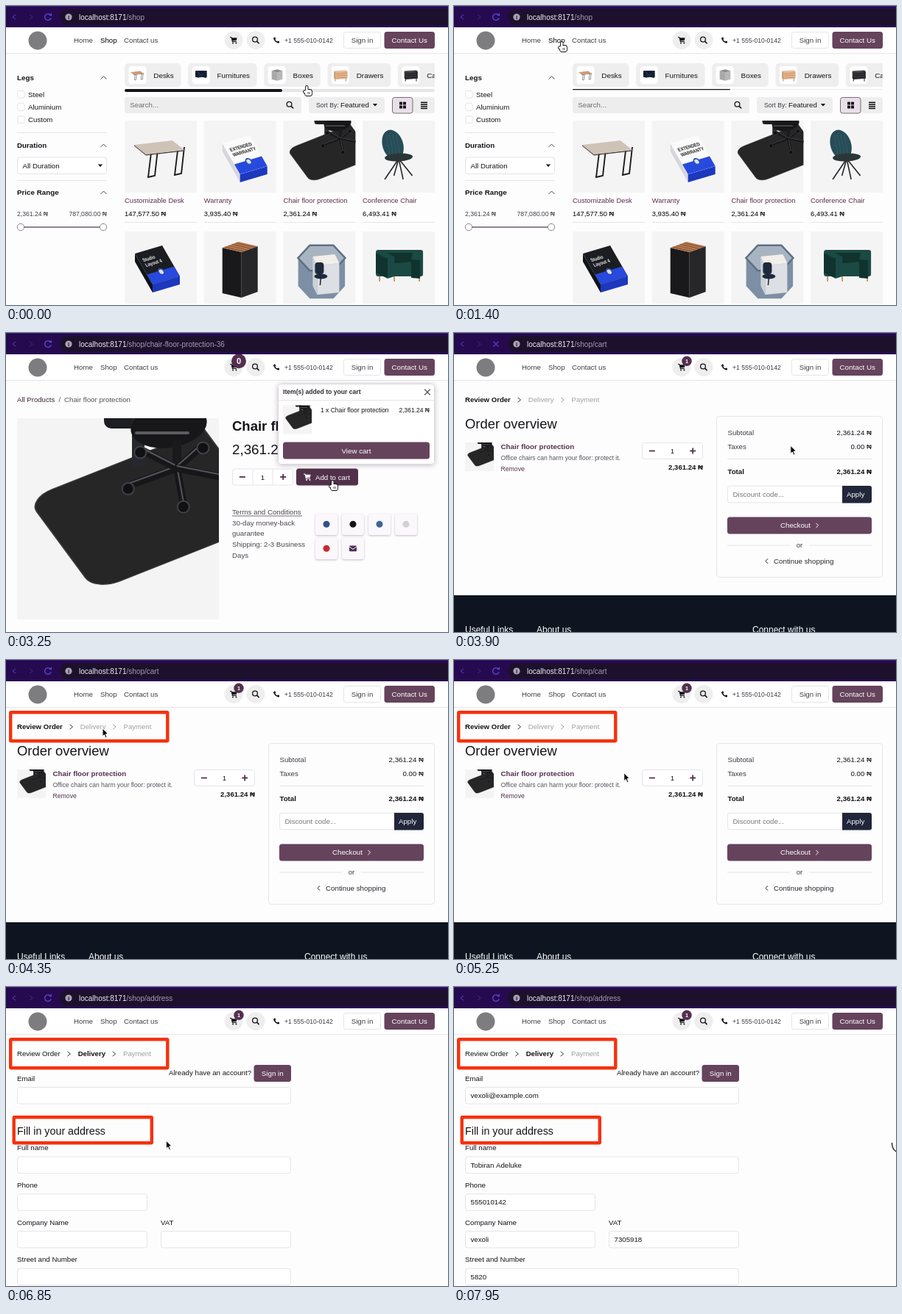
An HTML page with a canvas for the animation above (8 s loop, 600 by 407 pixels).

```html
<!DOCTYPE html>
<html lang="en">
<head>
<meta charset="utf-8">
<title>Shop checkout</title>
<style>
  html, body { margin: 0; width: 100%; height: 100%; overflow: hidden; background: #fff; }
  canvas { display: block; width: 600px; height: 407px; }
</style>
</head>
<body>
<canvas id="stage"></canvas>
<script>
const LOOP = 8000, W = 600, H = 407, TAU = Math.PI * 2;
const FONT = '"Liberation Sans", Arial, "DejaVu Sans", sans-serif';
const PLUM = '#65435c', PLUM_DARK = '#513149', INK = '#161318', GREY = '#55525a', SLATE = '#3f3c43';
const PALE = '#efeeef', LINE = '#e6e4e6', PHOTO = '#f5f4f5', RED = '#f6310d', TEAL = '#1b4a44';
const ITEM = 'Chair floor protection', PRICE = '2,361.24 ₦';
const RIGHT = { align: 'right' }, CENTER = { align: 'center' }, BOLD = { bold: true };

const canvas = document.getElementById('stage');
const dpr = window.devicePixelRatio || 1;
canvas.width = W * dpr;
canvas.height = H * dpr;
const g = canvas.getContext('2d');

// ---- helpers ----
const range = (n, fn) => Array.from({ length: n }, (_, i) => fn(i));
function ease(v) {
  v = Math.max(0, Math.min(1, v));
  return v * v * (3 - 2 * v);
}
function text(s, x, y, size = 9.7, color = INK, { bold, align = 'left' } = {}) {
  g.font = `${bold ? 'bold ' : ''}${size}px ${FONT}`;
  g.textAlign = align;
  g.fillStyle = color;
  g.fillText(s, x, y);
}
function paint(fill, stroke, lw = 1) {
  if (fill) { g.fillStyle = fill; g.fill(); }
  if (stroke) { g.strokeStyle = stroke; g.lineWidth = lw; g.stroke(); }
}
function box(x, y, w, h, r, fill, stroke, lw) {
  g.beginPath();
  g.roundRect(x, y, w, h, r);
  paint(fill, stroke, lw);
}
function oval(x, y, rx, ry, turn, fill) {
  g.beginPath();
  g.ellipse(x, y, rx, ry, turn, 0, TAU);
  paint(fill);
}
function disc(x, y, r, fill, stroke, lw) {
  g.beginPath();
  g.arc(x, y, r, 0, TAU);
  paint(fill, stroke, lw);
}
function trace(p) {
  g.beginPath();
  for (let i = 0; i < p.length; i += 2) g.lineTo(p[i], p[i + 1]);
}
function poly(fill, ...p) {
  trace(p);
  g.closePath();
  paint(fill);
}
function line(color, lw, ...p) {
  trace(p);
  paint(null, color, lw);
}
const rule = (x1, x2, y) => line(LINE, 1, x1, y, x2, y);
function scoped(draw) {
  g.save();
  draw();
  g.restore();
}
function shadowed(blur, draw) {
  scoped(() => {
    g.shadowColor = 'rgba(40,20,50,.28)';
    g.shadowBlur = blur * dpr;
    g.shadowOffsetY = dpr;
    draw();
  });
}

// ---- icons and controls ----
const chevronUp = (x, y) => line('#4a464e', 1, x - 4, y + 2, x, y - 2, x + 4, y + 2);
const chevron = (x, y, dx, color) => line(color, 1, x - dx, y - 3.2, x + dx, y, x - dx, y + 3.2);
const caret = (x, y) => poly(INK, x - 3.2, y - 1.6, x + 3.2, y - 1.6, x, y + 2);
const minus = (x, y) => box(x - 4, y - .9, 8, 1.8, 0, '#54304e');
function plus(x, y) {
  minus(x, y);
  box(x - .9, y - 4, 1.8, 8, 0, '#54304e');
}
function cross(x, y, r, color) {
  line(color, 1.2, x - r, y - r, x + r, y + r);
  line(color, 1.2, x - r, y + r, x + r, y - r);
}
function magnifier(x, y) {
  disc(x - 1, y - 1, 3.4, null, INK, 1.3);
  line(INK, 1.5, x + 1.6, y + 1.6, x + 4.6, y + 4.6);
}
function cart(x, y, c) {
  line(c, 1.1, x - 5, y - 4, x - 3, y - 4, x - 1.6, y + 2, x + 4, y + 2);
  poly(c, x - 2.8, y - 3.2, x + 4.6, y - 3.2, x + 3.8, y + .6, x - 1.8, y + 1);
  for (const dx of [-1, 3.4]) disc(x + dx, y + 4, 1, c);
}
function handset(x, y) {
  g.beginPath();
  g.arc(x + 2.8, y - 2.8, 5.5, 1.6, 3.1);
  paint(null, INK, 1.9);
  disc(x - 2.4, y - 2.6, 1.5, INK);
  disc(x + 2.6, y + 2.4, 1.5, INK);
}
function field(x, y, w, s = '', color = INK) {
  box(x + .5, y + .5, w - 1, 22.5, 3, '#fff', LINE);
  text(s, x + 7.5, y + 15, 9.7, color);
}
function searchField(x, y, w, iconX) {
  box(x, y, w, 22.3, 3.5, '#eeedee');
  text('Search...', x + 7.3, y + 14.4, 9.7, '#6c6970');
  magnifier(iconX, y + 10.8);
}
function button(s, x, y, w, hover) {
  box(x, y, w, 23, 3.5, hover ? PLUM_DARK : PLUM);
  text(s, x + w / 2, y + 15, 9.8, '#fff', CENTER);
}
function quantity(x, y, w) {
  box(x + .5, y + .5, w - 1, 22, 3, '#fff', LINE);
  minus(x + w / 6, y + 11.5);
  text('1', x + w / 2, y + 15, 9.7, INK, CENTER);
  plus(x + w * 5 / 6, y + 11.5);
}

// ---- products on a 98 x 98 tile ----
// Plane with corner (x, y) whose two sides u and v are each 100 units long.
function plane(x, y, [ux, uy], [vx, vy], draw) {
  scoped(() => {
    g.transform(ux / 100, uy / 100, vx / 100, vy / 100, x, y);
    draw();
  });
}
function prism(x, y, u, v, h, top, left, front, drawTop) {
  const face = (fill, px, py, a, b) => plane(px, py, a, b, () => box(0, 0, 100, 100, 0, fill));
  face(left, x, y, v, [0, h]);
  face(front, x + v[0], y + v[1], u, [0, h]);
  face(top, x, y, u, v);
  if (drawTop) plane(x, y, u, v, drawTop);
}
function carton(x, y, cover, side, ink, words) {
  prism(x, y, [37, -11], [24, 42], 11, cover, side, '#1d37bd', () => {
    box(0, 68, 100, 32, 0, '#2849de');
    words.forEach((s, i) => text(s, 12, 30 + i * 16, 14.5, ink, BOLD));
    disc(50, 72, 9, '#d8e0f8', '#2c4fa5', 4);
  });
}
function desk(top) {
  const legs = (x, y) => line('#1b1b1d', 1.9, x, y, x - 4, y + 33, x + 5, y + 31, x + 9, y - 5);
  legs(36, 44);
  legs(72, 41);
  prism(13, 33, [52, -6], [16, 13], 1.5, top, '#4a403a', '#4a403a');
}
const cabinet = () => prism(25, 22, [22, -8], [26, 6], 62, '#b9794f', '#19191b', '#272628', () =>
  range(4, i => box(10 + i * 23, 0, 6, 100, 0, '#6d4027')));
function floorMat() {
  g.scale(98 / 274, 98 / 274);
  plane(14, 110, [240, -95], [92, 125], () => box(0, 0, 100, 100, [14, 0, 0, 14], '#262627', '#3c3b3d', .7));
  box(118, -10, 50, 24, 10, '#1d1e21');
  box(156, -10, 17, 76, 4, '#26282d');
  oval(206, 10, 52, 30, -.15, '#17171a');
  box(160, 18, 74, 4, 2, '#5b5b60');
  box(211, 30, 12, 40, 2, '#1a1a1d');
  range(5, i => {
    const a = 1.45 + i * TAU / 5, x = 217 + 73 * Math.cos(a), y = 74 + 43 * Math.sin(a);
    line('#17171a', 10, 217, 68, x, y);
    line('#54565c', 2, 217, 65, x, y - 3);
    disc(x, y + 4, 8, '#111113', '#414147', 2);
  });
}
function meetingChair() {
  range(4, i => line('#1d1d1f', 1.5, 49, 52, 30 + i * 12.5, 80 - (i % 2) * 5));
  oval(41, 33, 14, 21, -.3, '#264c58');
  range(4, i => line('#3b6570', .6, 32 + i * 4.5, 19, 37 + i * 4.5, 46));
  oval(49, 50, 19, 5.5, -.05, '#2b363b');
}
function ring(n, draw) {
  trace(range(n, i => [52 + 32 * Math.cos(i * TAU / n), 36 + 20 * Math.sin(i * TAU / n)]).flat());
  g.closePath();
  draw();
}
function booth() {
  scoped(() => range(38, () => {
    g.translate(0, 1);
    ring(6, () => paint('#7d8fa4'));
  }));
  ring(6, () => paint('#a9b4c1', '#5c6f86', 2.5));
  prism(40, 34, [30, -3], [6, 12], 40, '#f2eeea', '#ccd1d8', '#dcdfe3');
  box(43, 42, 12, 16, 4, '#1d2a3d');
  oval(51, 61, 9, 3.5, 0, '#1d2a3d');
  line('#222', 1.5, 51, 62, 50, 73);
}
function sofa(c, shade) {
  for (const x of [23, 43, 77]) line('#b58b57', 1.6, x, 56, x, 68);
  box(18, 25, 64, 36, 3, c);
  box(31, 29, 39, 14, 2, shade);
  prism(28, 45, [40, -4], [8, 7], 9, c, shade, c);
  prism(18, 29, [9, -3], [16, 8], 27, c, shade, c);
  prism(68, 28, [12, 1], [-2, 10], 25, c, shade, shade);
}
const crate = () => prism(20, 26, [30, -9], [30, 9], 46, '#8d8d91', '#a9a8a8', '#b8b7b7');
function chest(c, edge) {
  for (const x of [20, 80]) line(edge, 4, x, 60, x, 84);
  prism(14, 27, [66, -5], [8, 6], 40, c, edge, c);
  range(3, i => line(edge, 3, 22, 42 + i * 12, 88, 37 + i * 12));
}
function tile(x, y, size, draw, bg = PHOTO, r = 0) {
  scoped(() => {
    box(x, y, size, size, r, bg);
    g.clip();
    g.translate(x, y);
    g.scale(size / 98, size / 98);
    draw();
  });
}

// ---- browser and site chrome ----
function browserBar(path, loading) {
  box(0, 0, W, 29, 0, '#260a50');
  box(0, 0, W, 1, 0, '#3a1670');
  box(73, 4, 540, 22, 11, '#1d102c');
  chevron(11, 15, -2, '#5c44cf');
  chevron(34, 15, 2, '#452a7d');
  if (loading) cross(57, 15, 3.6, '#5c44cf');
  else {
    g.beginPath();
    g.arc(57, 15, 4.4, .3, 5.5);
    paint(null, '#5c44cf', 1.4);
    poly('#5c44cf', 58, 12.8, 62, 13.4, 62, 9.4);
  }
  disc(85, 15, 4.6, '#a9a2b4');
  text('i', 85, 17.9, 8, '#1d102c', { bold: true, align: 'center' });
  text('localhost:8171', 99, 18.7, 10, '#f1edf6');
  text(path, 99 + g.measureText('localhost:8171').width, 18.7, 10, '#a49bb0');
}
function siteHeader(t, page) {
  box(0, 29, W, 36, 0, '#fff');
  rule(0, W, 64.5);
  if (page !== productPage || t > 2420) {
    disc(43, 47, 12.5, '#7d7d7f');
    text('Home', 92, 50, 9.7, SLATE);
    text('Shop', 128, 50, 9.7, page === shopPage ? '#000' : SLATE);
    text('Contact us', 160, 50, 9.7, SLATE);
  }
  for (const x of [309, 339]) disc(x, 46.5, 12.5, PALE);
  cart(309, 46.5, INK);
  magnifier(339, 46.5);
  handset(367, 46.5);
  text('+1 555-010-0142', 378, 50, 8.6, SLATE);
  box(458.5, 35.5, 50, 22, 3, '#fff', LINE);
  text('Sign in', 483.5, 50, 9.7, SLATE, CENTER);
  button('Contact Us', 513.5, 35, 68.5);
  if (t < 3060) return;
  const r = 6.7 + 3.3 * (ease((t - 3060) / 150) - ease((t - 3280) / 160));
  disc(316, 38.3, r, '#54304e');
  text(t < 3350 ? '0' : '1', 316, 38.3 + r * .4, r * 1.1, '#fff', { bold: true, align: 'center' });
}

// ---- pages ----
function filterTitle(s, y) {
  text(s, 15, y, 9.8, INK, BOLD);
  chevronUp(132.5, y - 3);
}
function categories(hover) {
  let x = 161;
  scoped(() => {
    g.beginPath();
    g.rect(161, 70, 421, 50);
    g.clip();
    for (const [name, draw] of [
      ['Desks', () => desk('#d29a70')],
      ['Furnitures', () => sofa('#1d2740', '#121a2e')],
      ['Boxes', crate],
      ['Drawers', () => chest('#e3b48f', '#c58a60')],
      ['Cabinets', () => chest('#333438', '#19191b')]
    ]) {
      g.font = `9.9px ${FONT}`;
      const w = 49 + g.measureText(name).width;
      box(x, 78, w, 32, 5, PALE);
      tile(x + 5.5, 82, 24, draw, '#fff', 4);
      text(name, x + 39.3, 97.5, 9.9);
      x += w + 9.7;
    }
  });
  const h = hover ? 4 : 1.2;
  box(161, 113, 421, h, h / 2, hover ? '#e6e5e6' : '#f0eff0');
  box(161, 113, 214, h, h / 2, '#17131a');
}
function shopPage(t) {
  filterTitle('Legs', 100.5);
  ['Steel', 'Aluminium', 'Custom'].forEach((s, i) => {
    box(15.5, 115.5 + i * 17.2, 9.5, 9.5, 2, '#fff', LINE);
    text(s, 30, 123.7 + i * 17.2);
  });
  rule(15, 137, 172.5);
  filterTitle('Duration', 193);
  field(15, 205.5, 122, 'All Duration');
  caret(128, 217);
  rule(15, 137, 237.5);
  filterTitle('Price Range', 257);
  text(PRICE, 15, 286, 8.6, SLATE);
  text('787,080.00 ₦', 137, 286, 8.6, SLATE, RIGHT);
  line('#6d5f6b', 1.3, 20, 301, 132, 301);
  for (const x of [20, 132]) disc(x, 301, 4.7, '#fff', '#8b858e');

  categories(t < 350);
  searchField(161, 124, 240, 385.5);
  box(411, 124, 103, 22, 3.5, PALE);
  text('Sort By:', 421, 138, 8.6, SLATE);
  text('Featured', 454, 138, 9.7);
  caret(501, 134.5);
  box(552, 124, 30, 22, 3.5, PALE);
  box(524.5, 124.5, 27.5, 21.5, 3, '#e9dfe8', '#7b6a78');
  range(4, i => {
    box(534 + (i % 2) * 5, 130.5 + (i >> 1) * 5, 4, 4, .6, INK);
    box(563, 130.5 + i * 2.7, 9, 1.6, 0, INK);
  });

  [
    ['Customizable Desk', '147,577.50 ₦', () => desk('#cfc3b8'),
      () => carton(14, 30, '#1c1d23', '#121318', '#eee', ['Studio', 'Layout 4'])],
    ['Warranty', '3,935.40 ₦', () => carton(25, 31, '#fbfbfc', '#d6d7dd', '#222', ['EXTENDED', 'WARRANTY']), cabinet],
    [ITEM, PRICE, floorMat, booth],
    ['Conference Chair', '6,493.41 ₦', meetingChair, () => sofa(TEAL, '#10332e')]
  ].forEach(([name, price, upper, lower], i) => {
    const x = 161 + i * 107.7;
    tile(x, 156, 98, upper);
    text(name, x, 267.5, 9.4, '#5a2f4f');
    text(price, x, 285.5, 9.4, '#000');
    rule(x, x + 98, 294.5);
    tile(x, 307, 98, lower);
  });
}
function productPage(t) {
  text('All Products', 15, 93.5, 9.6, '#3c2336');
  text('/', 71.5, 93.5, 9.6, GREY);
  text(ITEM, 79, 93.5, 9.7, GREY);
  searchField(405, 78.6, 177, 567);
  tile(15, 116, 274, floorMat);
  text(ITEM, 307, 133, 18.5, INK, BOLD);
  text(PRICE, 307, 165, 18.8);
  quantity(307, 184.5, 83);
  for (const x of [335, 362]) line(LINE, 1, x, 185, x, 207);
  button('', 394, 184.5, 84, t > 2800);
  cart(409, 196, '#fff');
  text('Add to cart', 420, 199.5, 9.7, '#fff');
  ['Terms and Conditions', '30-day money-back', 'guarantee', 'Shipping: 2-3 Business', 'Days']
    .forEach((s, i) => text(s, 307, 247 + i * 14.7, 9.7, '#4a474e'));
  line('#4a474e', .8, 307, 249, 402, 249);
  ['#33508f', '#151515', '#3d6596', '#d3d1d3', '#c9282d', null].forEach((c, i) => {
    const x = 420 + (i % 4) * 36, y = i < 4 ? 246 : 279, cx = x + 15, cy = y + 14.3;
    shadowed(3, () => box(x, y, 30, 29, 3, '#faf8fa'));
    if (c) return disc(cx, cy, 4.5, c);
    box(cx - 5, cy - 3.8, 10, 7.8, 1.2, '#4d2c58');
    line('#faf8fa', 1, cx - 5, cy - 2.4, cx, cy + 1, cx + 5, cy - 2.4);
  });
}
function cartPopup(t) {
  scoped(() => {
    g.globalAlpha = ease((t - 3020) / 130);
    shadowed(7, () => box(369, 69, 213, 110, 4, '#fff'));
    box(369.5, 69.5, 212, 109, 4, null, '#dcd9dc');
    text('Item(s) added to your cart', 376, 83.3, 8.6, '#2f2c33', BOLD);
    cross(572, 80.5, 3.8, SLATE);
    rule(369, 582, 91.5);
    tile(376, 98.5, 39, floorMat);
    text('1 x ' + ITEM, 427, 108.3, 8.5);
    text(PRICE, 575, 108.3, 8.5, INK, RIGHT);
    button('View cart', 376, 148.5, 199, t > 3640);
  });
}
function steps(active) {
  let x = 15;
  ['Review Order', 'Delivery', 'Payment'].forEach((s, i) => {
    const color = i > active ? '#a19fa3' : INK;
    if (i) chevron(x - 12.3, 91, 2, i > active + 1 ? '#a19fa3' : SLATE);
    text(s, x, 94, 9.6, color, { bold: i === active });
    x += g.measureText(s).width + 24;
  });
}
const marker = (x, y, w, h) => box(x + 2.2, y + 2.2, w - 4.4, h - 4.4, 1, null, RED, 4.4);

function cartPage(t) {
  steps(0);
  text('Order overview', 15, 130, 18.4);
  tile(15, 149, 39, floorMat);
  text(ITEM, 63.5, 158.3, 9.75, '#54304e', BOLD);
  text('Office chairs can harm your floor: protect it.', 63.5, 173, 8.5, GREY);
  text('Remove', 63.5, 187.5, 8.7, '#54304e');
  quantity(255, 149, 83);
  text(PRICE, 338, 185.7, 9.6, INK, { ...BOLD, ...RIGHT });

  box(356.5, 113.5, 225, 219, 4, null, LINE);
  const row = (label, value, y, bold) => {
    text(label, 371.5, y, 9.7, bold ? INK : SLATE, { bold });
    text(value, 567, y, 9.7, INK, { bold, ...RIGHT });
  };
  row('Subtotal', PRICE, 138.5);
  row('Taxes', '0.00 ₦', 157.8);
  rule(371, 567, 171.5);
  row('Total', PRICE, 192, true);
  field(371, 207.8, 196, 'Discount code...', '#77747a');
  box(527, 208, 40, 23.5, [0, 3, 3, 0], '#22263a');
  text('Apply', 533, 222.8, 9.7, '#fff');
  button('', 371, 250.5, 196, t > 5500);
  text('Checkout', 443, 265.3, 9.7, '#fff');
  chevron(493, 262, 1.6, '#fff');
  rule(371, 456, 289);
  rule(482, 567, 289);
  text('or', 469, 292, 9.7, SLATE, CENTER);
  chevron(424.5, 310.5, -1.5, INK);
  text('Continue shopping', 434, 313.7, 9.75, '#2a262d');

  box(0, 357, W, 50, 0, '#0e1520');
  text('Useful Links', 15, 408, 12, '#fff');
  text('About us', 112, 408, 12, '#fff');
  text('Connect with us', 405, 408, 12, '#fff');
  if (t > 4150) marker(4, 69, 217.5, 43.5);
}
function addressPage(t) {
  steps(1);
  text('Already have an account?', 221, 120, 9.7);
  button('Sign in', 336.5, 106, 50.5);
  text('Fill in your address', 15, 201, 14.3);
  const entry = (label, value, x, y, w) => {
    text(label, x, y - 8.3);
    field(x, y, w, t > 7000 + y ? value : '');
  };
  const row = i => 230.5 + i * 50.7;
  entry('Email', 'vexoli@example.com', 15, 136, 372);
  entry('Full name', 'Tobiran Adeluke', 15, row(0), 372);
  entry('Phone', '555010142', 15, row(1), 177);
  entry('Company Name', 'vexoli', 15, row(2), 177);
  entry('VAT', '7305918', 210, row(2), 177);
  entry('Street and Number', '5820', 15, row(3), 372);
  marker(4, 69, 217.5, 43.5);
  if (t > 6450) marker(8.5, 175, 191.5, 39.5);
}

// ---- pointer ----
const ROUTE = [ // leave, arrive, x, y
  [150, 1300, 145, 49], [1500, 2050, 436, 265], [2480, 2850, 442, 201], [3350, 3650, 472, 156],
  [3850, 4250, 131, 93], [5050, 5550, 412, 264], [6450, 7050, 150, 190], [7700, 7930, 612, 212]
];
function pointer(t) {
  let x = 407, y = 109;
  for (const [leave, arrive, tx, ty] of ROUTE) {
    const k = ease((t - leave) / (arrive - leave));
    x += (tx - x) * k;
    y += (ty - y) * k;
  }
  scoped(() => {
    g.translate(x, y);
    g.lineJoin = 'round';
    if (t >= 3900) {
      trace([0, 0, 0, 11, 2.5, 8.8, 4.3, 13, 6.2, 12.2, 4.4, 8, 7.6, 7.6]);
      g.closePath();
      return paint('#0c0c0c', '#fff');
    }
    g.beginPath();
    g.roundRect(0, 0, 2.6, 9, 1.3);
    g.roundRect(-1, 5, 9, 8, 2.5);
    g.roundRect(-3, 6.2, 5, 3, 1.5);
    paint(null, '#111', 1.8);
    paint('#fff');
    range(2, i => line('#111', .7, 3 + i * 2, 8, 3 + i * 2, 11));
  });
}

// ---- timeline ----
function render(t) {
  g.setTransform(dpr, 0, 0, dpr, 0, 0);
  box(0, 0, W, H, 0, '#fefdfe');
  const page = t < 2150 ? shopPage : t < 3900 ? productPage : t < 6100 ? cartPage : addressPage;
  page(t);
  siteHeader(t, page);
  if (page === productPage && t > 3020) cartPopup(t);

  const path = t < 2100 ? '' : t < 3860 ? '/chair-floor-protection-36' : t < 5900 ? '/cart' : '/address';
  const loading = [2100, 3860, 5900].some(from => t >= from && t < from + 330);
  browserBar('/shop' + path, loading);
  if (t < 7900) return pointer(t);
  g.beginPath();
  g.ellipse(606, 212, 11.5, 14, 0, 2, Math.PI);
  paint(null, '#111', 1.3);
}
const start = performance.now();
function tick() {
  render((performance.now() - start) % LOOP);
  requestAnimationFrame(tick);
}
tick();
</script>
</body>
</html>
```
